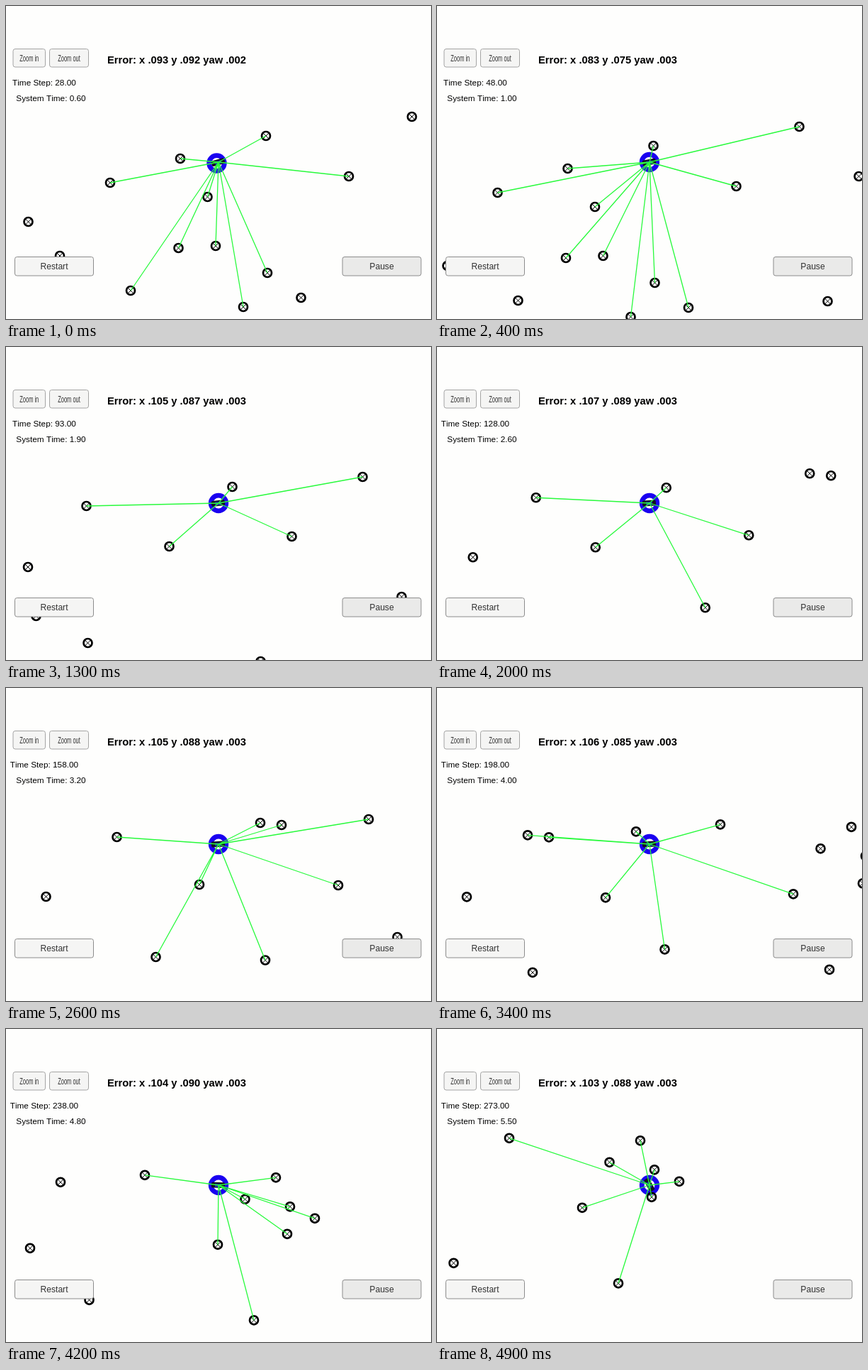
An HTML page with a canvas that plays this animation: 600 by 441 pixels, repeating every 5 s.

```html
<!DOCTYPE html>
<html lang="en">
<head>
<meta charset="utf-8">
<title>Localization</title>
<style>
html, body { margin: 0; width: 100%; height: 100%; overflow: hidden; background: #fefefd; }
canvas { display: block; width: 600px; height: 441px; }
</style>
</head>
<body>
<canvas id="stage" width="600" height="441"></canvas>
<script>
const ctx = document.getElementById('stage').getContext('2d');
const LOOP = 5000, STEP = 100, RANGE = 221.5;
const CAR = { x: 300, y: 220 };
const PAPER = '#fefefd', LIGHT = '#f5f5f4', GRAY = '#eaeae9';
const SANS = '"Liberation Sans", Arial, sans-serif';

// Landmark positions on the map
const landmarks = [
  [573, 156], [367, 183], [246, 215], [484, 240], [147, 249], [284.5, 269],
  [31.5, 304], [243.5, 341], [296, 338], [76, 352], [176, 401], [369, 376],
  [416.5, 411], [335, 424], [657, 226], [613, 402], [757, 142], [812, 311],
  [959.5, 122], [989.5, 125], [1112.5, 117], [873.5, 209], [1069.5, 210],
  [966.5, 315.5], [1153, 283], [1231.5, 107], [1334.5, 205], [1385.5, 311.5],
  [1373, 141], [1416.5, 110.5], [1436.5, 151.5], [1432.5, 190], [1471.5, 168]
];

// Drive: seconds, map x, map y, error x, error y (thousandths)
const drive = [
  [0, 0, 0, 93, 92],
  [0.4, -61.5, 14, 83, 75],
  [1.3, -253.5, 41, 105, 87],
  [2.6, -600.5, 68, 105, 88],
  [3.4, -831.5, 85.3, 106, 85],
  [4, -993.8, 96.9, 105, 88],
  [4.2, -1035.5, 98.8, 104, 90],
  [4.9, -1129.5, 46.8, 103, 88]
];
const last = drive.length - 1;

const slope = (i, k) =>
  (drive[i + 1][k] - drive[i][k]) / (drive[i + 1][0] - drive[i][0]);

// Tangent of the parabola through a key and its neighbours
function tangent(i, k) {
  if (i === 0) return 2 * slope(0, k) - tangent(1, k);
  if (i === last) return 2 * slope(last - 1, k) - tangent(last - 1, k);
  const before = drive[i][0] - drive[i - 1][0];
  const after = drive[i + 1][0] - drive[i][0];
  return (slope(i - 1, k) * after + slope(i, k) * before) / (before + after);
}

// Smooth value of column k at time s
function sample(k, s) {
  let i = 0;
  while (i < last - 1 && s >= drive[i + 1][0]) i++;
  const a = drive[i], b = drive[i + 1], h = b[0] - a[0];
  const u = (s - a[0]) / h, v = 1 - u;
  return a[k] * v * v * (1 + 2 * u) + b[k] * u * u * (1 + 2 * v) +
    h * u * v * (tangent(i, k) * v - tangent(i + 1, k) * u);
}

function headingAt(s) {
  const d = 0.005;
  const rate = k => sample(k, s - d) - sample(k, s + d);
  return Math.atan2(rate(2), rate(1));
}

// Start-up error of the estimate, fading out
const lagAt = s => Math.exp(-9 * s);

function errorText(s) {
  const show = v => '.' + String(Math.round(v)).padStart(3, '0');
  return `Error: x ${show(sample(3, s))} y ${show(sample(4, s))} yaw ${show(3 - lagAt(s))}`;
}

function circle(x, y, r) {
  ctx.beginPath();
  ctx.arc(x, y, r, 0, Math.PI * 2);
}

function label(str, x, y, size, { weight = '', color = '#000', align = 'center', squeeze = 1 } = {}) {
  ctx.save();
  ctx.translate(x, y);
  ctx.scale(squeeze, 1);
  ctx.font = `${weight} ${size}px ${SANS}`;
  ctx.fontKerning = 'none';
  ctx.textAlign = align;
  ctx.fillStyle = color;
  ctx.fillText(str, 0, 0);
  ctx.restore();
}

function button(str, x, y, w, h, fill, edge, squeeze) {
  ctx.beginPath();
  ctx.roundRect(x, y, w, h, 3);
  ctx.fillStyle = fill;
  ctx.fill();
  ctx.strokeStyle = edge;
  ctx.lineWidth = 1;
  ctx.stroke();
  label(str, x + w / 2, y + h / 2 + 4.3, 12.1, { color: '#323232', squeeze });
}

function landmark({ x, y }) {
  circle(x, y, 6);
  ctx.strokeStyle = '#000';
  ctx.lineWidth = 2.7;
  ctx.stroke();
  ctx.beginPath();
  for (const d of [-4, 4]) {
    ctx.moveTo(x - 4, y - d);
    ctx.lineTo(x + 4, y + d);
  }
  ctx.lineWidth = 1;
  ctx.stroke();
}

function vehicle(s) {
  const lag = lagAt(s);
  circle(CAR.x - 2.5 * lag, CAR.y + 1.5 * lag, 10.8);
  ctx.fillStyle = PAPER;
  ctx.fill();
  ctx.strokeStyle = '#1a00f0';
  ctx.lineWidth = 6.8;
  ctx.stroke();

  ctx.save();
  ctx.translate(CAR.x, CAR.y);
  ctx.rotate(headingAt(s));
  ctx.fillStyle = '#10141c';
  ctx.beginPath();
  ctx.roundRect(-10, -4, 19, 8, 2);
  ctx.fill();
  ctx.fillStyle = '#1c2fae';
  ctx.fillRect(-5, -2, 9, 5);
  ctx.restore();
}

function beams(marks) {
  ctx.strokeStyle = '#28fa3c';
  ctx.lineWidth = 1.3;
  ctx.beginPath();
  for (const { x, y } of marks) {
    if (Math.hypot(x - CAR.x, y - CAR.y) > RANGE) continue;
    ctx.moveTo(CAR.x, CAR.y);
    ctx.lineTo(x, y);
  }
  ctx.stroke();
}

function draw(s) {
  ctx.fillStyle = PAPER;
  ctx.fillRect(0, 0, 600, 441);

  const dx = sample(1, s), dy = sample(2, s);
  const marks = landmarks.map(([x, y]) => ({ x: x + dx, y: y + dy }));
  vehicle(s);
  marks.forEach(landmark);
  beams(marks);

  button('Zoom in', 10, 60.5, 45.5, 25.5, LIGHT, '#a4a4a4', 0.62);
  button('Zoom out', 61.5, 60.5, 55, 25.5, LIGHT, '#a4a4a4', 0.62);
  button('Restart', 12.5, 353.5, 111, 26.5, LIGHT, '#8c8c8c');
  button('Pause', 475, 353.5, 111, 26.5, GRAY, '#8c8c8c');

  label(errorText(s), 143, 80.8, 14.75, { weight: 'bold', align: 'left' });
  label(`Time Step: ${(28 + s * 50).toFixed(2)}`, 53.9, 112, 11.8);
  label(`System Time: ${(0.6 + s).toFixed(2)}`, 63.5, 134.4, 11.8);
}

const start = performance.now();
function tick() {
  const t = (performance.now() - start) % LOOP;
  draw(Math.floor(t / STEP) * STEP / 1000);
  requestAnimationFrame(tick);
}
tick();
</script>
</body>
</html>
```
